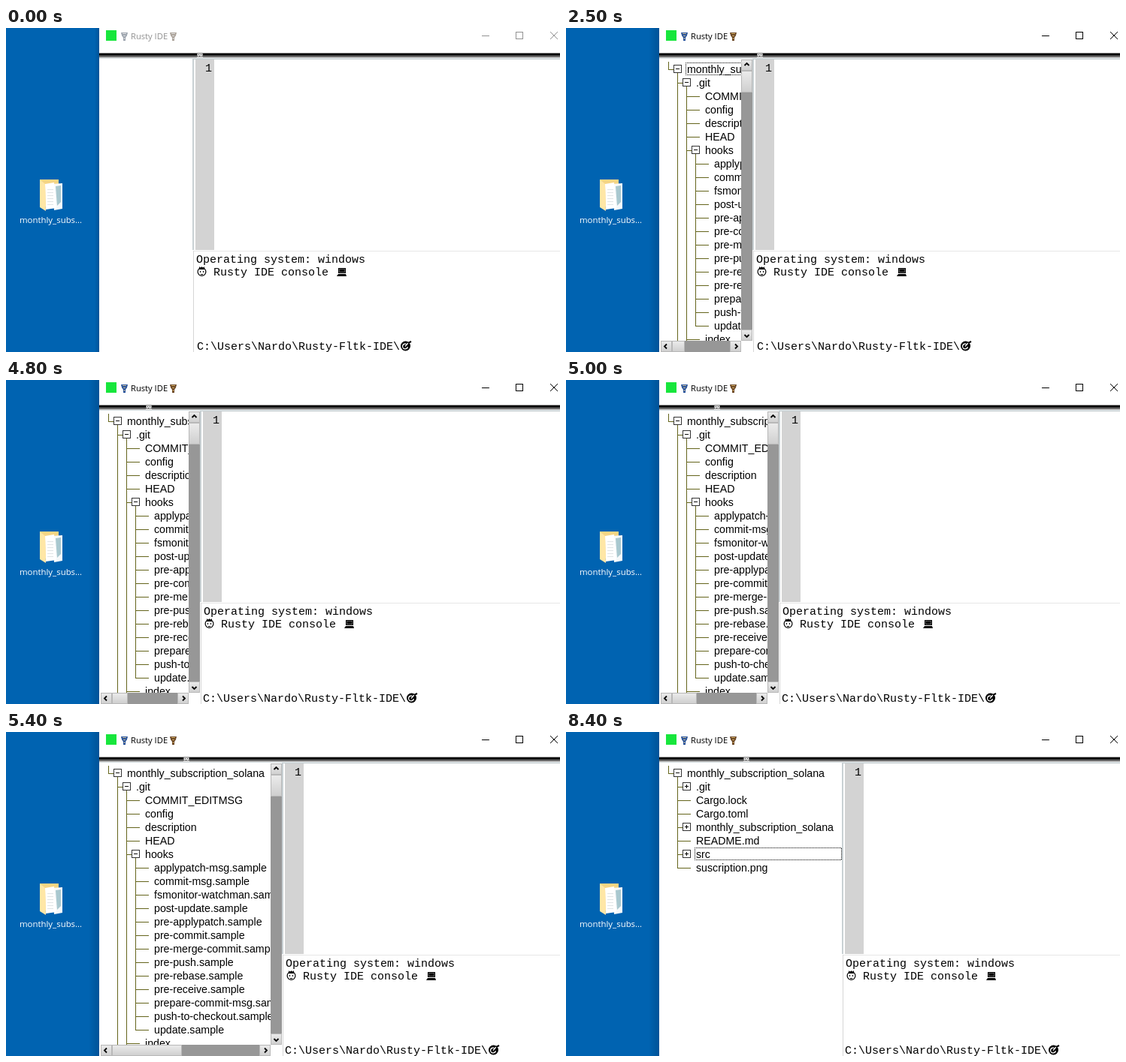
Recreate the animation shown at these times as an HTML page with a canvas. Size 737x432 px, loop 9.1 s.

```html
<!DOCTYPE html>
<html lang="en">
<head>
<meta charset="utf-8">
<title>Rusty IDE</title>
<style>
html, body { margin: 0; width: 100%; height: 100%; overflow: hidden; background: #0063b1; }
canvas { display: block; width: 737px; height: 432px; }
</style>
</head>
<body>
<canvas id="stage" width="737" height="432"></canvas>
<script>
const ctx = document.getElementById('stage').getContext('2d');
const W = 737, H = 432, LOOP = 9100;
const TREE_X = 126, TREE_Y = 42, TREE_BOTTOM = 417, BAR = 15, ROW = 18;
const UI = '"Open Sans", sans-serif';
const SANS = '14.2px "Liberation Sans", Arial, sans-serif';
const MONO = '15px "Liberation Mono", "Courier New", monospace';

// Folders are arrays: [name, ...children]
const sample = names => names.split(' ').map(n => n + '.sample');
let seed = 7;
const hex = n => {
  let s = '';
  while (s.length < n) {
    seed = (seed * 16807) % 2147483647;
    s += (seed % 16).toString(16);
  }
  return s;
};
const objects = ['objects'];
for (let i = 0; i < 92; i++) {
  objects.push([Math.floor(i * 2.7 + 2).toString(16).padStart(2, '0'), hex(38)]);
}
const hooks = ['hooks', ...sample('applypatch-msg commit-msg fsmonitor-watchman post-update ' +
  'pre-applypatch pre-commit pre-merge-commit pre-push pre-rebase pre-receive ' +
  'prepare-commit-msg push-to-checkout update')];
const git = ['.git', 'COMMIT_EDITMSG', 'config', 'description', 'HEAD', hooks, 'index',
  ['info', 'exclude'], ['logs', 'HEAD', ['refs', ['heads', 'main']]], objects,
  ['refs', ['heads', 'main'], 'tags']];
const inner = ['monthly_subscription_solana', 'Cargo.toml',
  ['src', 'errors.rs',
    ['instructions', 'create.rs', 'delete.rs', 'mod.rs', 'renew.rs', 'suscribe.rs', 'use_sus.rs'],
    'lib.rs', ['state', 'accounts.rs', 'mod.rs']],
  'Xargo.toml'];
const src = ['src', 'errors.rs', ['instructions', 'create.rs', 'mod.rs'], 'lib.rs',
  ['state', 'accounts.rs', 'mod.rs']];
const root = ['monthly_subscription_solana', git, 'Cargo.lock', 'Cargo.toml', inner,
  'README.md', src, 'suscription.png'];

const trees = [
  { t: 1600, closed: [root], focus: null, width: 220 },
  { t: 2500, closed: [], focus: root, width: 478 },
  { t: 3500, closed: [], focus: null, width: 478 },
  { t: 6300, closed: [hooks], focus: hooks, width: 478 },
  { t: 7000, closed: [git], focus: git, width: 229 },
  { t: 7700, closed: [git, inner], focus: inner, width: 229 },
  { t: 8400, closed: [git, inner, src], focus: src, width: 229 }
];

// time, pane split, grip centre
const splits = [
  [0, 250, 258], [3500, 252, 240], [3600, 253, 222], [3700, 254, 204], [3800, 255, 188],
  [4700, 257, 189], [4800, 260, 190], [4900, 271, 195], [5000, 285, 201], [5100, 300, 208],
  [5200, 315, 215], [5300, 342, 228], [5400, 369, 240]
];

function flatten(node, closed, depth = 0, parent = null, rows = []) {
  const folder = Array.isArray(node);
  const open = folder && !closed.includes(node);
  const row = { node, folder, open, depth, parent, y: 55 + rows.length * ROW };
  rows.push(row);
  if (open) node.slice(1).forEach(kid => flatten(kid, closed, depth + 1, row, rows));
  return rows;
}
trees.forEach(tree => { tree.rows = flatten(root, tree.closed); });

function rect(x, y, w, h, color) {
  ctx.fillStyle = color;
  ctx.fillRect(x, y, w, h);
}
function frame(x, y, w, h, color) {
  ctx.strokeStyle = color;
  ctx.lineWidth = 1;
  ctx.strokeRect(x + 0.5, y + 0.5, w - 1, h - 1);
}
function text(s, x, y, font, color = '#000') {
  ctx.font = font;
  ctx.fillStyle = color;
  ctx.fillText(s, x, y);
}
function poly(points, color) {
  ctx.fillStyle = color;
  ctx.beginPath();
  points.forEach(([x, y]) => ctx.lineTo(x, y));
  ctx.fill();
}
function line(points, color, width = 1) {
  ctx.strokeStyle = color;
  ctx.lineWidth = width;
  ctx.beginPath();
  points.forEach(([x, y]) => ctx.lineTo(x, y));
  ctx.stroke();
}
function disc(x, y, r, color) {
  ctx.fillStyle = color;
  ctx.beginPath();
  ctx.arc(x, y, r, 0, 7);
  ctx.fill();
}

function folder(x, y) {
  ctx.save();
  ctx.translate(x, y);
  rect(0, 0, 25, 36, '#f6d584');
  poly([[17, 6], [30, 5], [30, 39], [19, 41]], '#f7f9fa');
  poly([[21, 9], [28, 8], [28, 30], [23, 35]], '#a9c8cf');
  poly([[7, 6], [19, 4], [22, 38], [8, 40]], '#ffffff');
  for (let i = 0; i < 6; i++) rect(10, 13 + i * 4, 8, 1, '#dfe4e6');
  poly([[0, 0], [7, 6], [8, 42], [0, 37]], '#ffe7a6');
  ctx.restore();
}

function desktop(t) {
  rect(0, 0, W, H, '#0063b1');
  const reach = t < 1600 ? 6 : 14;
  const shade = ctx.createLinearGradient(124 - reach, 0, 124, 0);
  shade.addColorStop(0, 'rgba(0,25,60,0)');
  shade.addColorStop(1, 'rgba(0,25,60,.22)');
  rect(124 - reach, 0, reach, H, shade);
  if (t >= 300 && t < 1100) {
    rect(12, 195, 96, 70, 'rgba(255,255,255,.18)');
    frame(12, 195, 96, 70, 'rgba(255,255,255,.35)');
  }
  folder(45, 202);
  text('monthly_subs...', 18, 260, '11.4px ' + UI, '#fff');
  if (t >= 1000 && t < 1100) {
    ctx.globalAlpha = 0.55;
    folder(82, 196);
    ctx.globalAlpha = 1;
  }
}

function funnel(x, color, tip) {
  poly([[x, 6], [x + 9, 6], [x + 8, 10], [x + 6, 13], [x + 6, 17], [x + 3, 17], [x + 3, 13], [x + 1, 10]], color);
  rect(x + 2, 7, 5, 1, tip);
  rect(x + 3, 10, 3, 1, tip);
  rect(x + 4, 13, 1, 2, tip);
}

function titleBar(active) {
  const ink = active ? '#000' : '#929292';
  rect(133, 3, 14, 14, '#17e63c');
  funnel(153, active ? '#234f9a' : '#9ba3ad', active ? '#d5c59a' : '#e4e4e4');
  text('Rusty IDE', 166, 15, '11.2px ' + UI, ink);
  funnel(218, active ? '#674321' : '#aaa198', active ? '#dcb96f' : '#e4e4e4');
  rect(633, 10, 10, 1, ink);
  frame(678, 5, 10, 10, ink);
  line([[724, 5], [734, 15]], ink);
  line([[734, 5], [724, 15]], ink);
}

function separator(grip) {
  rect(124, 33, W - 124, 1, '#8a8a8a');
  rect(124, 34, W - 124, 3, '#000');
  rect(124, 37, W - 124, 1, '#b4b4b4');
  rect(124, 38, W - 124, 1, '#222');
  rect(124, 40, W - 124, 1, '#c9d1d4');
  rect(grip - 4, 33, 8, 6, '#d2d2d2');
  frame(grip - 4, 33, 8, 6, '#8c8c8c');
  rect(grip - 2, 35, 1, 1, '#555');
  rect(grip + 1, 35, 1, 1, '#555');
  rect(grip - 1, 37, 1, 1, '#555');
}

function princess(x, y) {
  ctx.strokeStyle = '#000';
  ctx.lineWidth = 1.2;
  ctx.beginPath();
  ctx.arc(x + 6.5, y + 7, 5.4, 0, 7);
  ctx.stroke();
  poly([[x + 3, y + 4], [x + 3, y], [x + 5, y + 2], [x + 6.5, y], [x + 8, y + 2], [x + 10, y], [x + 10, y + 4]], '#000');
  rect(x + 4, y + 6, 1, 2, '#000');
  rect(x + 8, y + 6, 1, 2, '#000');
  rect(x + 5, y + 10, 3, 1, '#000');
}
function laptop(x, y) {
  rect(x + 2, y, 10, 7, '#000');
  frame(x + 3, y + 1, 8, 5, '#555');
  poly([[x + 2, y + 8], [x + 12, y + 8], [x + 13, y + 11], [x, y + 11]], '#000');
}
function dart(x, y) {
  disc(x + 6.5, y + 7, 6.5, '#000');
  ctx.strokeStyle = '#fff';
  ctx.lineWidth = 1.3;
  ctx.beginPath();
  ctx.arc(x + 6, y + 7.5, 3.4, 0.2, 5.2);
  ctx.stroke();
  line([[x + 6, y + 7.5], [x + 10, y + 3]], '#fff', 1.2);
  line([[x + 10, y + 3], [x + 14, y + 1]], '#000', 2);
}

function editor(split, promptGap) {
  rect(split - 2, 41, W, H, '#fff');
  rect(split - 2, 41, W, 1, '#c9d1d4');
  rect(split - 2, 41, 2, 255, '#c9d1d4');
  rect(split - 1, 297, 1, 135, '#d6d6d6');
  rect(split + 2, 42, 25, 254, '#d3d3d3');
  text('1', split + 15, 58, MONO);
  rect(split, 297, W - split, 1, '#e6e6e6');
  const x = split + 3;
  text('Operating system: windows', x, 313, MONO);
  princess(x + 1, 318);
  text('Rusty IDE console', x + 23, 330, MONO);
  laptop(x + 187, 320);
  const prompt = 'C:\\Users\\Nardo\\Rusty-Fltk-IDE\\';
  text(prompt, split + promptGap, 429, MONO);
  dart(split + promptGap + 271, 417);
}

function toggle(x, y, open) {
  rect(x - 5, y - 6, 11, 11, '#fff');
  frame(x - 5, y - 6, 11, 11, '#333');
  rect(x - 2, y - 1, 5, 1, '#000');
  if (!open) rect(x, y - 3, 1, 5, '#000');
}

function raised(x, y, w, h) {
  const shine = ctx.createLinearGradient(0, y, 0, y + h);
  shine.addColorStop(0, '#ececec');
  shine.addColorStop(1, '#cecece');
  rect(x, y, w, h, shine);
  frame(x, y, w, h, '#b8b8b8');
}
function button(x, y, dx, dy) {
  raised(x, y, BAR, BAR);
  const cx = x + 7.5 + dx * 2.5, cy = y + 7.5 + dy * 2.5;
  line([
    [cx - dx * 3 - dy * 3, cy - dy * 3 - dx * 3],
    [cx, cy],
    [cx - dx * 3 + dy * 3, cy - dy * 3 + dx * 3]
  ], '#000', 1.8);
}
function scrollBar(x, y, length, ratio, vertical) {
  const track = length - 2 * BAR, size = Math.round(track * Math.min(1, ratio));
  if (vertical) {
    rect(x, y, BAR, length, '#979797');
    button(x, y, 0, -1);
    button(x, y + length - BAR, 0, 1);
    raised(x, y + BAR, BAR, size);
  } else {
    rect(x, y, length, BAR, '#979797');
    button(x, y, -1, 0);
    button(x + length - BAR, y, 1, 0);
    raised(x + BAR, y, size, BAR);
  }
}

function treeView(tree, split) {
  const right = split - 2;
  const total = tree.rows.length * ROW;
  const tall = total > TREE_BOTTOM - TREE_Y;
  const viewRight = tall ? right - BAR : right;
  const wide = tree.width > viewRight - TREE_X;
  const bottom = wide ? TREE_BOTTOM : H;
  const olive = '#65651c';

  ctx.save();
  ctx.beginPath();
  ctx.rect(TREE_X, TREE_Y, viewRight - TREE_X, bottom - TREE_Y);
  ctx.clip();
  rect(136, 45, 1, 10, olive);
  for (const { node, folder, depth, parent, y } of tree.rows) {
    const x = 136 + depth * 12;
    if (parent && parent.y < H) rect(x, parent.y, 1, y - parent.y, olive);
    if (y > H + ROW) continue;
    rect(x, y, folder ? 8 : 18, 1, olive);
    text(folder ? node[0] : node, x + 25, y + 5, SANS);
    if (node === tree.focus) {
      ctx.setLineDash([1, 1]);
      ctx.lineDashOffset = 0.5;
      frame(x + 23, y - 9, right - x - 23, 17, '#000');
      ctx.setLineDash([]);
    }
  }
  for (const { folder, open, depth, y } of tree.rows) {
    if (folder && y < H) toggle(148 + depth * 12, y, open);
  }
  ctx.restore();

  if (tall) scrollBar(viewRight, TREE_Y, bottom - TREE_Y, (bottom - TREE_Y) / total, true);
  if (wide) scrollBar(TREE_X, TREE_BOTTOM, viewRight - TREE_X, (viewRight - TREE_X) / tree.width, false);
}

function draw(t) {
  const [, split, grip] = splits.findLast(s => t >= s[0]);
  const tree = trees.findLast(s => t >= s.t);
  desktop(t);
  rect(124, 0, W - 124, H, '#fff');
  titleBar(t >= 1600);
  separator(grip);
  editor(split, t < 3500 ? 4 : 2);
  if (tree) treeView(tree, split);
}

const start = performance.now();
function tick() {
  draw((performance.now() - start) % LOOP);
  requestAnimationFrame(tick);
}
tick();
</script>
</body>
</html>
```
